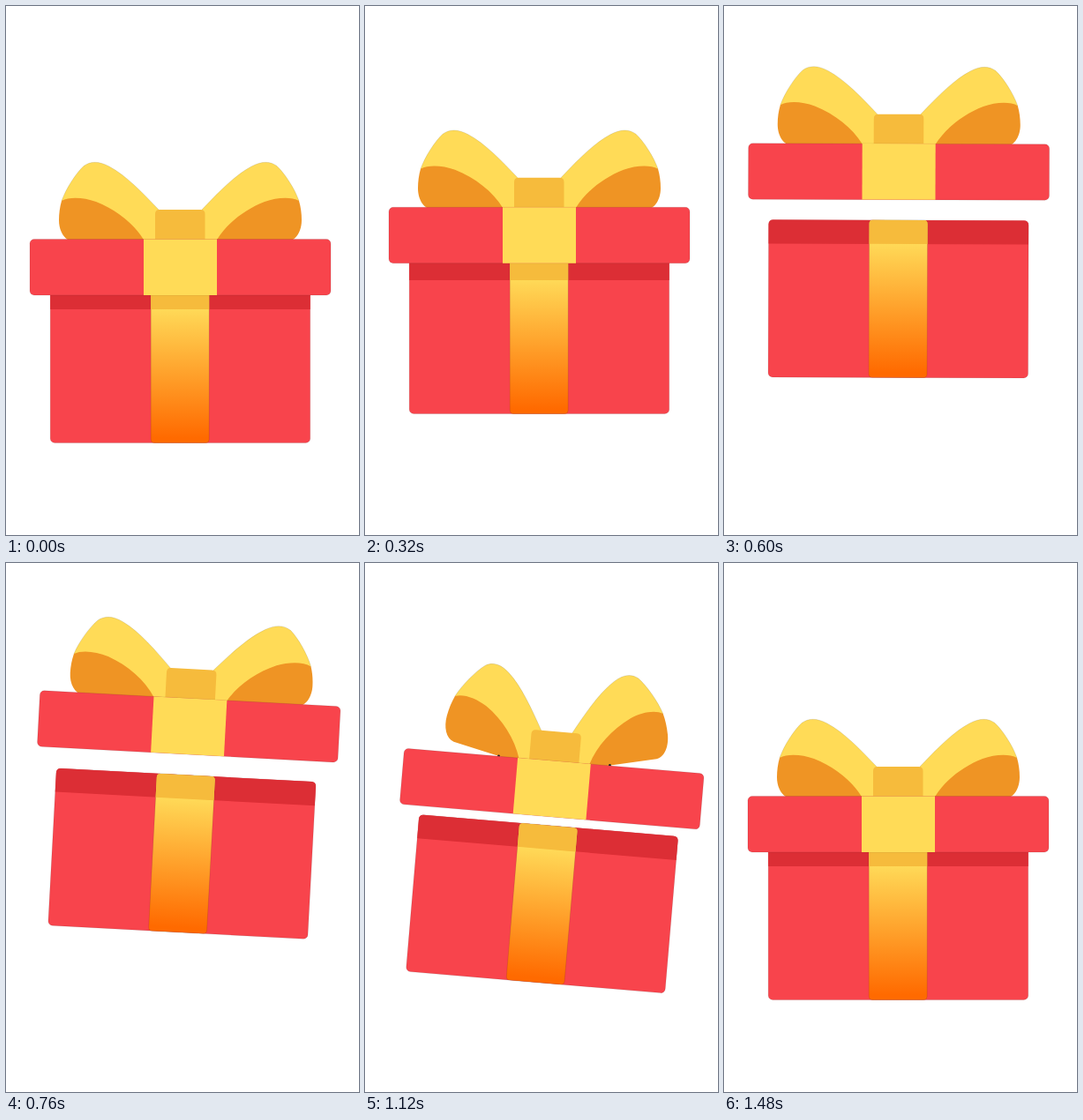
An HTML page that plays this animation: 400x600 px, repeating every 1.6 s.

```html
<!DOCTYPE html>
<html lang="en">
<head>
<meta charset="utf-8">
<title>Gift box</title>
<style>
  html, body { margin: 0; width: 100%; height: 100%; overflow: hidden; background: #fff; }
  svg { display: block; width: 100vw; height: 100vh; }
  .red { fill: #f8444c; }
  .shade { fill: #dc2e35; }
  .gold { fill: #ffdb57; }
  .knot { fill: #f6bb3c; }
  .fold { fill: #ef9424; }
  .edge { stroke: #000; stroke-opacity: .2; stroke-width: .5; }
</style>
</head>
<body>
<svg id="stage" viewBox="0 0 400 600">
  <defs>
    <linearGradient id="band" gradientUnits="userSpaceOnUse" x1="0" y1="344" x2="0" y2="490">
      <stop offset="0" stop-color="#ffd957"/>
      <stop offset="1" stop-color="#ff6a00"/>
    </linearGradient>
  </defs>
</svg>
<script>
const LOOP = 1600, STEP = 40, LAST = 1480;
const stage = document.getElementById('stage');

// Height of the box in the air: [ms, y]
const flight = [[0, 0], [320, -33], [480, -65], [720, -78], [1000, -41.5], [1280, 0]];

// Smooth curve through the points, without overshoot
function curve(points, t) {
  const n = points.length - 1;
  if (t >= points[n][0]) return points[n][1];
  const rate = i => (points[i + 1][1] - points[i][1]) / (points[i + 1][0] - points[i][0]);
  const slope = i => {
    if (i === 0 || i === n) return 0;
    const a = rate(i - 1), b = rate(i);
    return a * b <= 0 ? 0 : 2 * a * b / (a + b);
  };
  let i = 0;
  while (t > points[i + 1][0]) i++;
  const [t0, y0] = points[i], [t1, y1] = points[i + 1];
  const h = t1 - t0, u = (t - t0) / h, v = 1 - u;
  return y0 * (1 + 2 * u) * v * v + y1 * (1 + 2 * v) * u * u
    + h * u * v * (slope(i) * v - slope(i + 1) * u);
}

function ease(t, from, to) {
  const u = Math.min(1, Math.max(0, (t - from) / (to - from)));
  return u * u * (3 - 2 * u);
}

// Goes from 0 to 1 and back
const pulse = (t, up, top, down, end) => ease(t, up, top) - ease(t, down, end);

function poseAt(t) {
  const tilt = 4.85 * pulse(t, 560, 900, 1180, 1480);
  // Once landed, the tilted box stands on its lower right corner
  const corner = -147.5 * Math.sin(tilt * Math.PI / 180);
  return {
    tilt,
    lift: Math.min(curve(flight, t), corner),
    gap: 34.5 * pulse(t, 250, 620, 1000, 1280),
    perk: pulse(t, 760, 920, 1240, 1480)
  };
}

function makeGift() {
  const loop = `<g class="loop" >
    <path class="gold edge" d="M63 221C68 207 79 190 88 181.500C96 175.500 106 176 117 182
      C136 192 156 213 173 231L175 272H150Z"/>
    <path class="fold" d="M63 221C72 216 88 217 102 222C125 231 145 247 156 265L150 270
      L133 268.500L76 267C66 266 60 255 60 243C60 235 61 228 63 221Z"/>
    <circle cx="132" cy="268.500" r="1.500" fill="#222"/>
  </g>`;
  const g = document.createElementNS('http://www.w3.org/2000/svg', 'g');
  g.innerHTML = `
    <rect class="red edge" x="50.200" y="317" width="294.500" height="178.500" rx="5"/>
    <path class="shade" d="M50.200 344V322q0-5 5-5H339.700q5 0 5 5V344Z"/>
    <rect class="edge" x="164.200" y="317" width="66" height="178.500" rx="4" fill="url(#band)"/>
    <path class="knot" d="M164.200 344V321q0-4 4-4H226.200q4 0 4 4V344Z"/>
    <g class="lid">
      ${loop}
      <g transform="translate(395 0) scale(-1 1)">${loop}</g>
      <path class="knot" d="M169 266V236q0-5 5-5H220.500q5 0 5 5V266Z"/>
      <rect class="red edge" x="27" y="264.500" width="341" height="63.500" rx="5"/>
      <rect class="gold" x="156" y="264.500" width="83" height="63.500"/>
    </g>`;
  stage.append(g);
  const lid = g.querySelector('.lid'), loops = g.querySelectorAll('.loop');
  const pose = ({ lift, gap, tilt, perk }) => {
    g.setAttribute('transform', `translate(0 ${lift}) rotate(${tilt} 197.5 444)`);
    lid.setAttribute('transform', `translate(0 ${-gap})`);
    // Loops lean inwards and grow around their foot
    const lean = `matrix(${1 - .063 * perk} ${.185 * perk} ${-.2 * perk} ${1 + .07 * perk} ${1.5 * perk} 0)`;
    loops.forEach(l => l.setAttribute('transform', `translate(156 265) ${lean} translate(-156 -265)`));
  };
  return { g, pose };
}

const resting = makeGift(), moving = makeGift();
resting.pose(poseAt(0));

function render(ms) {
  const t = Math.min(Math.floor((ms % LOOP) / STEP) * STEP, LAST);
  moving.pose(poseAt(t));
  // The resting box shows behind the one that is landing
  resting.g.style.display = t >= 1200 && t < LAST ? '' : 'none';
}

const start = performance.now();
function tick() {
  render(performance.now() - start);
  requestAnimationFrame(tick);
}
tick();
</script>
</body>
</html>
```
